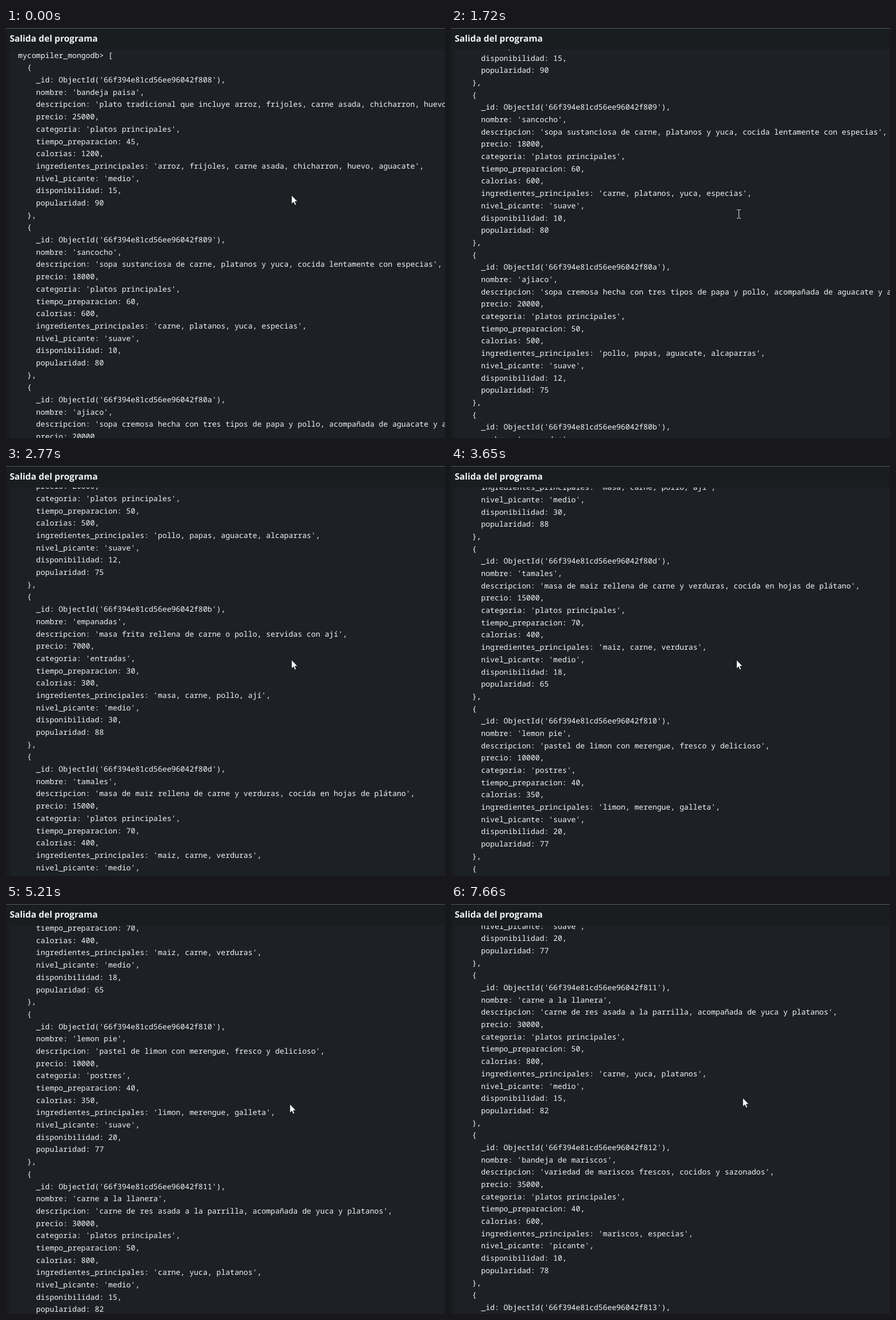
Recreate the animation shown at these times as an HTML page. Size 774 px wide and 723 px high, loop 8000 ms.

```html
<!DOCTYPE html>
<html lang="es">
<head>
<meta charset="utf-8">
<title>Salida del programa</title>
<style>
  html, body { margin: 0; width: 100%; height: 100%; overflow: hidden; background: #191d20; }
  svg { display: block; }
  text { text-rendering: geometricPrecision; white-space: pre; }
  .title { font: 700 15.65px "Open Sans", "Noto Sans", sans-serif; fill: #f3f4f5; }
  .row { font: 13.25px "Noto Sans Mono", "DejaVu Sans Mono", monospace; fill: #f4f5f6; }
</style>
</head>
<body>
<svg width="774" height="723" viewBox="0 0 774 723">
  <defs><clipPath id="view"><rect x="7" y="38" width="767" height="685"/></clipPath></defs>
  <rect width="774" height="723" fill="#191d20"/>
  <rect width="774" height="1" fill="#565a5d"/>
  <rect x="7" y="38" width="767" height="685" fill="#1d2125"/>
  <text class="title" x="6.5" y="24">Salida del programa</text>
  <g id="rows" clip-path="url(#view)"></g>
  <path id="arrow" d="M0 0V15.2L3.5 11.9L5.8 17.3L8.2 16.3L5.9 11H10.6Z" fill="#fff" stroke="#0b0d0e" stroke-width=".7"/>
  <path id="beam" d="M-3.5 -7.5H-1Q0 -7.5 0 -6.5Q0 -7.5 1 -7.5H3.5M0 -6.5V6.5M-3.5 7.5H-1Q0 7.5 0 6.5Q0 7.5 1 7.5H3.5" fill="none" stroke="#e4e5e6"/>
</svg>
<script>
const LOOP = 8000, PITCH = 21.69, NOTCH = 116.85, GLIDE = 220;
const $ = id => document.getElementById(id);

const KEYS = ['nombre', 'descripcion', 'precio', 'categoria', 'tiempo_preparacion', 'calorias',
  'ingredientes_principales', 'nivel_picante', 'disponibilidad', 'popularidad'];
const MAIN = 'platos principales';
const DISHES = [
  ['08', 'bandeja paisa', 'plato tradicional que incluye arroz, frijoles, carne asada, chicharron, huevo y aguacate',
    25000, MAIN, 45, 1200, 'arroz, frijoles, carne asada, chicharron, huevo, aguacate', 'medio', 15, 90],
  ['09', 'sancocho', 'sopa sustanciosa de carne, platanos y yuca, cocida lentamente con especias',
    18000, MAIN, 60, 600, 'carne, platanos, yuca, especias', 'suave', 10, 80],
  ['0a', 'ajiaco', 'sopa cremosa hecha con tres tipos de papa y pollo, acompañada de aguacate y alcaparras',
    20000, MAIN, 50, 500, 'pollo, papas, aguacate, alcaparras', 'suave', 12, 75],
  ['0b', 'empanadas', 'masa frita rellena de carne o pollo, servidas con ají',
    7000, 'entradas', 30, 300, 'masa, carne, pollo, ají', 'medio', 30, 88],
  ['0d', 'tamales', 'masa de maiz rellena de carne y verduras, cocida en hojas de plátano',
    15000, MAIN, 70, 400, 'maiz, carne, verduras', 'medio', 18, 65],
  ['10', 'lemon pie', 'pastel de limon con merengue, fresco y delicioso',
    10000, 'postres', 40, 350, 'limon, merengue, galleta', 'suave', 20, 77],
  ['11', 'carne a la llanera', 'carne de res asada a la parrilla, acompañada de yuca y platanos',
    30000, MAIN, 50, 800, 'carne, yuca, platanos', 'medio', 15, 82],
  ['12', 'bandeja de mariscos', 'variedad de mariscos frescos, cocidos y sazonados',
    35000, MAIN, 40, 600, 'mariscos, especias', 'picante', 10, 78],
  ['13']
];

const quote = v => typeof v === 'string' ? `'${v}'` : v;
const lines = ['mycompiler_mongodb> ['];
for (const [id, ...values] of DISHES) {
  lines.push('  {', `    _id: ObjectId('66f394e81cd56ee96042f8${id}'),`);
  values.forEach((v, i) =>
    lines.push(`    ${KEYS[i]}: ${quote(v)}${i < KEYS.length - 1 ? ',' : ''}`));
  if (values.length) lines.push('  },');
}

const rows = lines.map(line => {
  const el = document.createElementNS('http://www.w3.org/2000/svg', 'text');
  el.setAttribute('class', 'row');
  const indent = line.search(/\S/);
  el.setAttribute('x', 21.3 + indent * 7.95);
  el.textContent = line.slice(indent);
  $('rows').append(el);
  return el;
});

// The screen refreshes only at these moments: first, last, count.
const RUNS = [[930, 1440, 5], [1580, 1580, 1], [1720, 2500, 7], [2640, 3400, 7], [3530, 3650, 2],
  [4040, 4170, 2], [4430, 4550, 2], [4700, 5210, 5], [5490, 5620, 2], [5780, 5780, 1],
  [5930, 5930, 1], [6070, 6700, 6], [7120, 7370, 3], [7520, 7520, 1], [7660, 7660, 1]];
const ticks = [0];
for (const [a, b, n] of RUNS)
  for (let i = 0; i < n; i++)
    ticks.push(Math.round((a + (n > 1 ? (b - a) * i / (n - 1) : 0)) / 10) * 10);

// Start time of each wheel notch
const WHEEL = [880, 1500, 1760, 2020, 2330, 2632, 2900, 3180, 3420, 4390, 4800, 5420, 5830, 6400];

// Pointer path: time, x, y
const PATH = [[0, 503.5, 295], [1060, 503.5, 295], [1440, 508, 328], [1720, 508, 328],
  [2370, 503.5, 342], [3650, 503.5, 342], [4170, 503.5, 337], [4430, 503.5, 337],
  [5210, 500.5, 353], [5490, 500.5, 353], [6070, 501.5, 362], [6700, 503.5, 366],
  [6990, 503.5, 366], [7370, 513.5, 353], [7520, 514.5, 343], [7660, 514.5, 342], [LOOP, 514.5, 342]];

function scrollAt(t) {
  return NOTCH * WHEEL.reduce((sum, start) => {
    const p = Math.min(1, Math.max(0, (t - start) / GLIDE));
    return sum + 1 - (1 - p) ** 2;
  }, 0);
}

function pointerAt(t) {
  const i = PATH.findIndex(p => p[0] > t);
  const [t0, x0, y0] = PATH[i - 1], [t1, x1, y1] = PATH[i];
  const p = (t - t0) / (t1 - t0);
  return [x0 + (x1 - x0) * p, Math.round(y0 + (y1 - y0) * p)];
}

function draw(time) {
  const t = ticks.findLast(k => k <= time);
  const top = scrollAt(t);
  rows.forEach((el, i) => {
    const y = Math.round(52.7 + PITCH * i - top);
    el.setAttribute('y', y);
    el.style.display = y > 30 && y < 740 ? '' : 'none';
  });
  const [x, y] = pointerAt(t);
  const overText = t >= 1580 && t < 1850;
  $('arrow').setAttribute('transform', `translate(${x} ${y})`);
  $('beam').setAttribute('transform', `translate(${x - 0.5} ${y})`);
  $('arrow').style.display = overText ? 'none' : '';
  $('beam').style.display = overText ? '' : 'none';
}

const begin = performance.now();
function tick() {
  draw((performance.now() - begin) % LOOP);
  requestAnimationFrame(tick);
}
tick();
</script>
</body>
</html>
```
